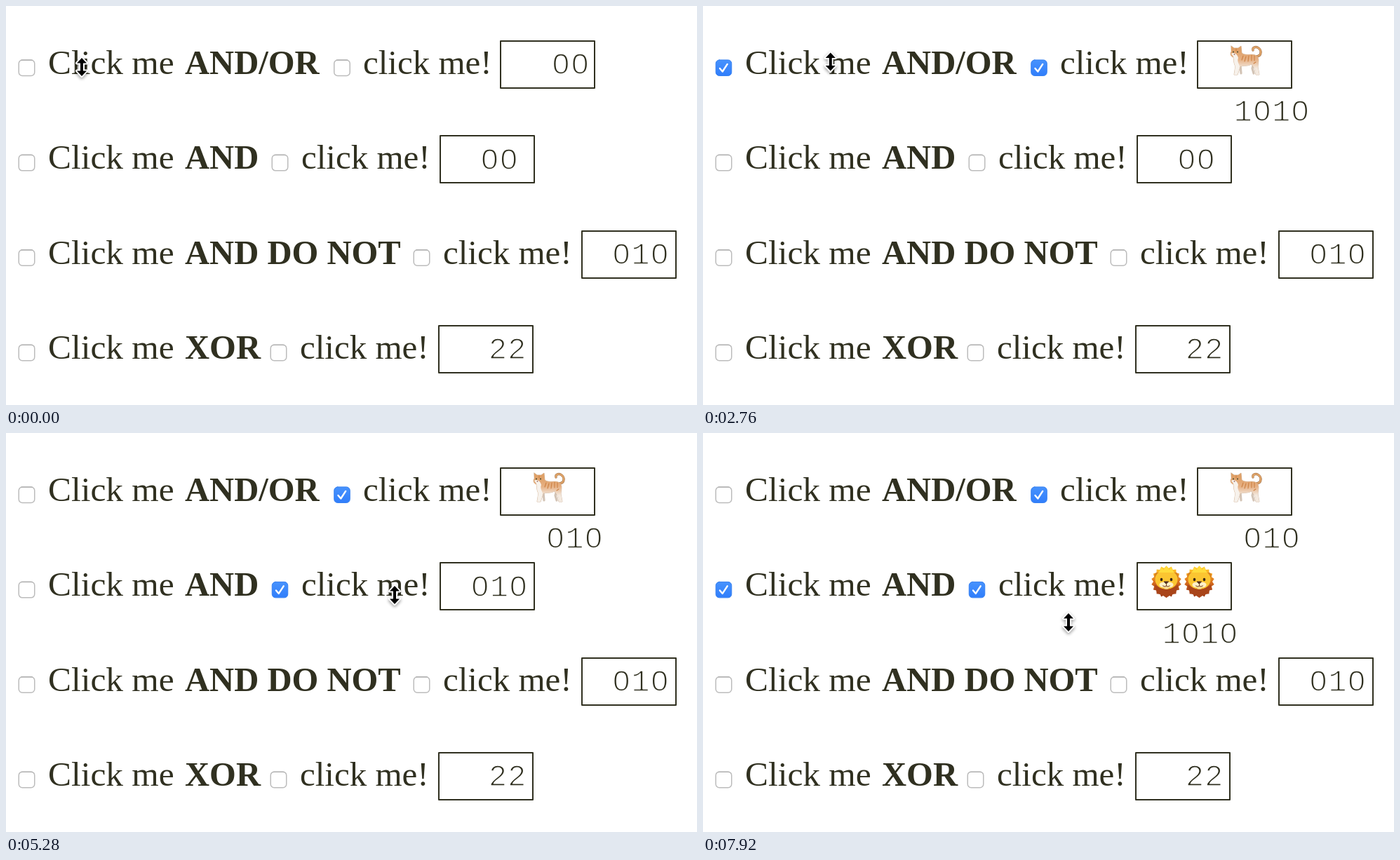
These frames come from a looping animation (985x569 px, 8000 ms). An HTML page with a canvas:

```html
<!DOCTYPE html>
<html lang="en">
<head>
<meta charset="utf-8">
<title>Click me logic</title>
<style>
html, body { margin: 0; width: 100%; height: 100%; overflow: hidden; background: #fff; }
canvas { display: block; }
</style>
</head>
<body>
<canvas id="stage" width="985" height="569"></canvas>
<script>
const ctx = document.getElementById('stage').getContext('2d');
const INK = '#303020', LOOP = 8000, STEP = 120, PITCH = 135.4;

// toggles: times at which the left and right checkbox flip
const rows = [
  { word: 'AND/OR', box2: 467, label2: 509, out: 705, mid: 804.5, below: 810.5,
    toggles: [[360, 3000], [2400]], wins: (a, b) => a || b, prize: cat },
  { word: 'AND', box2: 378.5, label2: 421, out: 619, mid: 703, below: 708.5,
    toggles: [[6240], [4680, 7080, 7560]], wins: (a, b) => a && b, prize: lions },
  { word: 'AND DO NOT', box2: 580.5, label2: 623, out: 821, mid: 904.5, fixed: '010' },
  { word: 'XOR', box2: 376.5, label2: 419, out: 617, mid: 714.5, fixed: '22' }
];

// Pointer stops: time, x, y
const stops = [
  [0, 108, 87], [840, 106, 86], [1440, 556, 80], [1680, 556, 80], [1920, 580, 77],
  [2400, 580, 77], [2880, 108, 80], [3120, 108, 80], [3480, 498, 77], [3840, 552, 90],
  [4560, 554, 231], [5400, 554, 231], [6000, 171, 230], [6360, 171, 230],
  [6960, 521, 219], [7560, 521, 219], [7800, 499, 236], [7920, 521, 270]
];

function pointerAt(t) {
  const i = stops.findIndex(s => s[0] > t);
  if (i < 0) return stops[stops.length - 1].slice(1);
  const [t0, x0, y0] = stops[i - 1], [t1, x1, y1] = stops[i];
  const u = (t - t0) / (t1 - t0), k = u * u * (3 - 2 * u);
  return [x0 + (x1 - x0) * k, y0 + (y1 - y0) * k];
}

function shape(d, fill, stroke, width) {
  const p = new Path2D(d);
  if (stroke) {
    ctx.strokeStyle = stroke;
    ctx.lineWidth = width;
    ctx.stroke(p);
  }
  if (fill) {
    ctx.fillStyle = fill;
    ctx.fill(p);
  }
}

function oval(x, y, rx, ry, fill) {
  ctx.fillStyle = fill;
  ctx.beginPath();
  ctx.ellipse(x, y, rx, ry, 0, 0, 7);
  ctx.fill();
}

function at(x, y, draw) {
  ctx.save();
  ctx.translate(x, y);
  ctx.lineCap = ctx.lineJoin = 'round';
  draw();
  ctx.restore();
}

function fade(y0, y1, ...colors) {
  const g = ctx.createLinearGradient(0, y0, 0, y1);
  colors.forEach((c, i) => g.addColorStop(i / (colors.length - 1), c));
  return g;
}

function label(text, x, y, weight, size) {
  ctx.font = `${weight} ${size}px "Liberation Serif", serif`;
  ctx.textAlign = 'left';
  ctx.fillStyle = INK;
  ctx.fillText(text, x, y);
}

// Light digits: a white outline thins the strokes, a patch opens each zero
function digits(text, mid, y) {
  ctx.font = '44px "Liberation Mono", monospace';
  ctx.textAlign = 'center';
  ctx.lineWidth = 1.6;
  ctx.lineJoin = 'round';
  [...text].forEach((ch, i) => {
    const x = mid + (i - (text.length - 1) / 2) * 27.2;
    ctx.fillStyle = INK;
    ctx.fillText(ch, x, y);
    ctx.strokeStyle = '#fff';
    ctx.strokeText(ch, x, y);
    if (ch === '0') oval(x, y - 14.5, 4.5, 6.5, '#fff');
  });
}

function checkbox(x, y, on) {
  at(x, y, () => {
    ctx.beginPath();
    ctx.roundRect(0.75, 0.75, 22.5, 22.5, 5);
    if (on) {
      ctx.fillStyle = fade(0, 24, '#4893fd', '#2f7dfb');
      ctx.fill();
      ctx.strokeStyle = '#347ff0';
      ctx.lineWidth = 1;
      ctx.stroke();
      shape('M6.5 12.8 L10.3 17.3 L17.2 6.7', null, '#fff', 2.4);
    } else {
      ctx.fillStyle = '#fff';
      ctx.fill();
      ctx.strokeStyle = '#bcbcbc';
      ctx.lineWidth = 1.5;
      ctx.stroke();
      shape('M4 1 H20', null, '#a8a8a8', 1);
    }
  });
}

function cat() {
  at(750, 55, () => {
    const tail = 'M39 17 C47 16 46 8 42 5 C38 2 33 4 34 8';
    shape(tail, null, '#a9794f', 3.4);
    shape(tail, null, '#e0a468', 2.2);
    shape('M16 30 L17 41 M35 27 L33 34 L35 41', null, '#d3c4b6', 3.2);
    const body = 'M3 2 L7 5 L13 5 L17 2 L18 12 C24 17 33 12 39 16 C44 20 41 27 41 32 L43 43 L38 43 L36 34 L32 28 ' +
                 'C26 31 21 30 16 31 L12 43 L7 43 L9 31 C6 26 7 21 6 18 C2 17 1 13 3 10 Z';
    shape(body, fade(8, 34, '#dfa168', '#e6b083', '#f3e9df'), '#c9ab90', 0.8);
    shape('M3 13 C7 10 12 14 13 19 C11 24 14 27 15 31 L11 43 L8 43 L9 31 C6 24 7 21 6 17 Z', '#f7f2ec');
    shape('M20 16 L18 22 M24 17 L22 24 M28 16 L27 24 M32 15 L32 23 M36 16 L36 23 M38 25 L35 27 M10 6 V9',
          null, '#cc8144', 1.1);
    oval(6, 10.5, 1, 1.1, '#41452b');
    oval(12, 10.5, 1, 1.1, '#41452b');
    oval(7.5, 14, 1, 0.7, '#8b5148');
  });
}

function spikes(n, inner, outer, fill) {
  ctx.fillStyle = fill;
  ctx.beginPath();
  for (let i = 0; i < n * 2; i++) {
    const a = i * Math.PI / n, r = i % 2 ? inner : outer;
    ctx.lineTo(r * Math.sin(a), -r * 1.06 * Math.cos(a));
  }
  ctx.fill();
}

function lion(x) {
  at(x, 212, () => {
    spikes(18, 18.5, 21.5, fade(-22, 23, '#ffd22e', '#f7a623', '#d9701f', '#ad4719', '#9b3a16'));
    oval(-13, -9, 4, 4, '#d9821f');
    oval(13, -9, 4, 4, '#d9821f');
    oval(0, -3, 16, 14, '#fbc531');
    shape('M-11 -13 L-7 -20 L-4 -17 L0 -22 L4 -17 L7 -20 L11 -13 Z', '#ffdc3c');
    shape('M-17 4 Q0 18 17 4 L13 17 L6 19 L0 23 L-6 19 L-13 17 Z', '#a9451a');
    oval(-4.5, 4.5, 5.5, 3.8, '#fff0c7');
    oval(4.5, 4.5, 5.5, 3.8, '#fff0c7');
    oval(0, 8.5, 3.5, 2.2, '#f5d997');
    oval(-7, -3, 1.8, 2.3, '#3a2614');
    oval(7, -3, 1.8, 2.3, '#3a2614');
    shape('M-3 0 H3 L0 3 Z', '#4a2b20', '#4a2b20', 1);
    shape('M0 3 V6 M-5 6 Q-2 8 0 6 Q2 8 5 6', null, '#70401f', 1);
  });
}

function lions() {
  lion(660.5);
  lion(707.5);
}

function pointer(x, y) {
  at(x, y, () => {
    const d = 'M0 -13 L7 -5.5 H2 V5.5 H7 L0 13 L-7 5.5 H-2 V-5.5 H-7 Z';
    ctx.shadowColor = 'rgba(0,0,0,.4)';
    ctx.shadowBlur = 4;
    ctx.shadowOffsetY = 2;
    shape(d, null, '#fff', 4);
    ctx.shadowColor = 'transparent';
    shape(d, '#000');
  });
}

function drawRow(row, i, t) {
  const y = i * PITCH;
  const [a, b] = (row.toggles || [[], []]).map(times => times.filter(s => s <= t).length % 2);
  checkbox(17.5, y + 76.2, a);
  label('Click me', 60, y + 97, 400, 49.4);
  label(row.word, 255, y + 97, 700, 48.6);
  checkbox(row.box2, y + 76.2, b);
  label('click me!', row.label2, y + 97, 400, 49);

  const score = row.fixed || (a ? '10' : '0') + (b ? '10' : '0');
  if (row.wins && row.wins(a, b)) {
    row.prize();
    digits(score, row.below, y + 164.2);
  } else {
    digits(score, row.mid, y + 97.2);
  }
  ctx.strokeStyle = INK;
  ctx.lineWidth = 2;
  ctx.strokeRect(row.out, Math.round(y + 50), 134, 67);
}

function frame(now) {
  const t = Math.floor(now % LOOP / STEP) * STEP;
  ctx.fillStyle = '#fff';
  ctx.fillRect(0, 0, 985, 569);
  rows.forEach((row, i) => drawRow(row, i, t));
  pointer(...pointerAt(t));
  requestAnimationFrame(frame);
}
requestAnimationFrame(frame);
</script>
</body>
</html>
```
